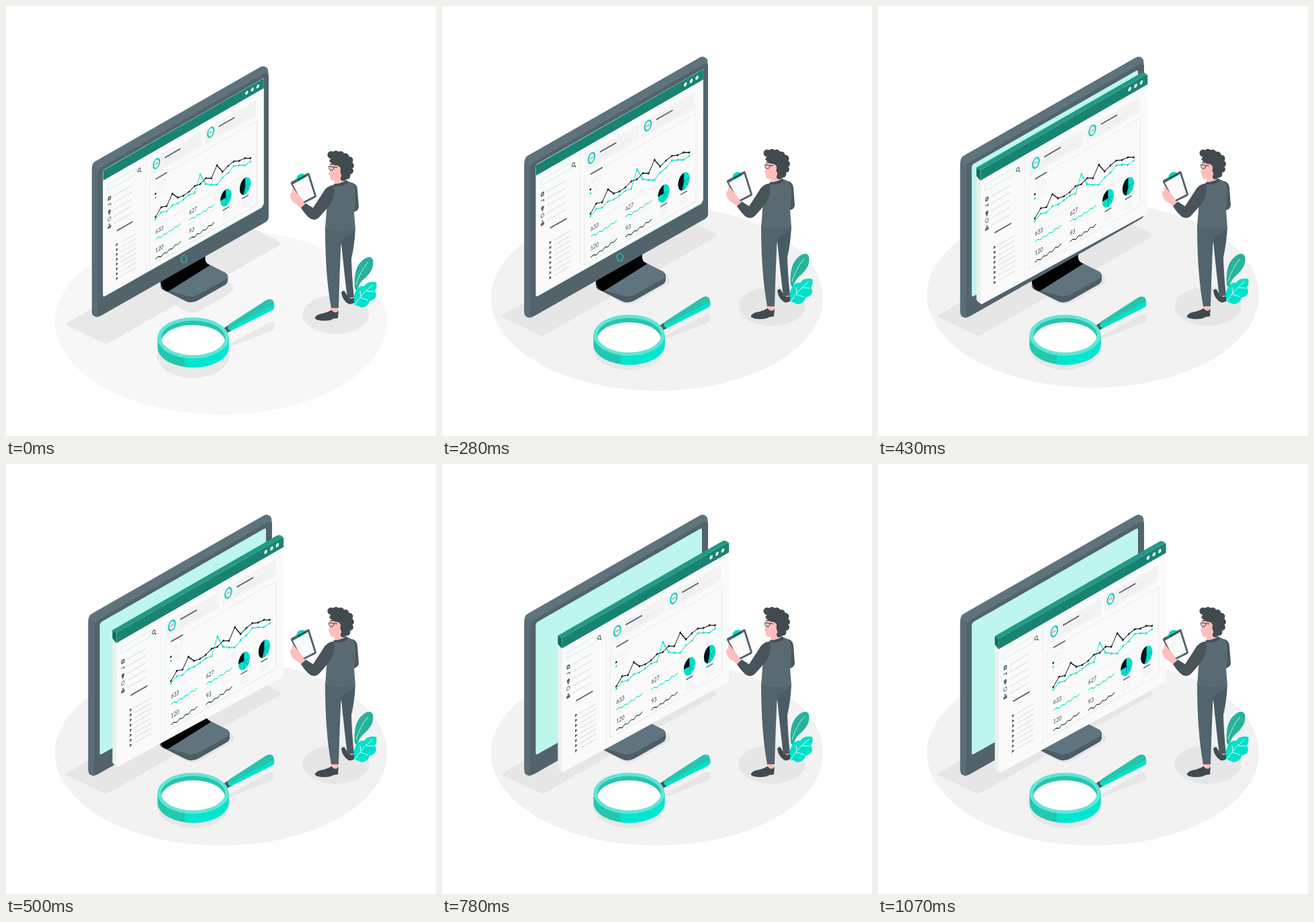
Animation of 640x640 px, one loop 1.5 s. Source, as an HTML page with a canvas:

```html
<!DOCTYPE html>
<html lang="en">
<head>
<meta charset="utf-8">
<title>Analytics desk</title>
<style>
html, body { margin: 0; width: 100%; height: 100%; overflow: hidden; background: #fff; }
canvas { display: block; width: 100vw; height: 100vh; object-fit: contain; }
</style>
</head>
<body>
<canvas id="stage" width="640" height="640"></canvas>
<script>
const ctx = document.getElementById('stage').getContext('2d');
const LOOP = 1500;
const STEPS = [0, 70, 140, 210, 280, 360, 430, 500, 570, 640, 710, 780, 860, 930, 1000, 1070];
const SLOPE = 0.575;
const CYAN = '#03e0cb', BLACK = '#0b1316', GREY = '#5d6a72', PALE = '#e5e6e6';

// Remaining share of a quadratic ease-out
const rest = (t, end) => Math.max(0, 1 - t / end) ** 2;

function fill(color, d) {
  ctx.fillStyle = color;
  ctx.fill(new Path2D(d));
}
function stroke(color, width, d) {
  ctx.strokeStyle = color;
  ctx.lineWidth = width;
  ctx.stroke(new Path2D(d));
}
function oval(color, x, y, rx, ry = rx) {
  ctx.fillStyle = color;
  ctx.beginPath();
  ctx.ellipse(x, y, rx, ry, 0, 0, Math.PI * 2);
  ctx.fill();
}
function ring(color, width, x, y, rx, ry = rx) {
  ctx.strokeStyle = color;
  ctx.lineWidth = width;
  ctx.beginPath();
  ctx.ellipse(x, y, rx, ry, 0, 0, Math.PI * 2);
  ctx.stroke();
}
function box(color, x, y, w, h, r = 0) {
  ctx.fillStyle = color;
  ctx.beginPath();
  ctx.roundRect(x, y, w, h, r);
  ctx.fill();
}
function frame(color, x, y, w, h) {
  ctx.strokeStyle = color;
  ctx.lineWidth = 0.8;
  ctx.beginPath();
  ctx.roundRect(x, y, w, h, 1);
  ctx.stroke();
}
function bar(color, x, y, len, width = 2) {
  stroke(color, width, `M${x} ${y}h${len}`);
}
function shifted(dx, dy, draw) {
  ctx.save();
  ctx.translate(dx, dy);
  draw();
  ctx.restore();
}
function label(text, x, y, size, align = 'left') {
  ctx.save();
  ctx.translate(x, y);
  ctx.scale(0.75, 1);
  ctx.font = `${size}px Lato, sans-serif`;
  ctx.textAlign = align;
  ctx.fillStyle = '#3a4246';
  ctx.fillText(text, 0, 0);
  ctx.restore();
}

function floor(t) {
  ctx.globalAlpha = 1 - 0.38 * rest(t, 430);
  oval('#f2f2f2', 320, 430 + 40 * rest(t, 430), 247, 138);
  ctx.globalAlpha = 1;
}

function shadows() {
  const c = '#e6e6e6';
  fill(c, 'M92 459L346 312Q350 310 354 312L407 339Q411 341 407 344L154 489Q150 492 146 490L92 464Q87 461 92 459Z');
  fill(c, 'M236 424L306 384L336 401Q343 407 336 414L290 441Q279 447 267 442Z');
  oval(c, 278.5, 508, 54, 33.5);
  fill(c, 'M328 494L390 460Q399 456 400 463Q400 468 396 471L338 494Z');
  oval(c, 491, 447, 49.5, 29);
}

function monitor() {
  // stand
  fill('#4c5d66', 'M229 405V417Q229 420 233 422L267 439Q277 444 287 438L329 414Q333 411 333 407V400L300 380Z');
  fill('#5f747e', 'M240 423L303 382L329 395Q337 401 329 406L288 429Q277 435 266 430Z');
  fill('#020404', 'M229 402L298 362V375Q299 381 305 384L243 423Q237 426 233 421L229 412Z');
  // case
  fill('#5e737c', 'M122.500 233Q122.500 225 129 222L383 77Q390 73 395 80L396 90V309Q396 314 391 317L134 463Q122.500 466 122.500 455Z');
  fill('#52636c', 'M131 242Q131 236 137 232L389 87Q396 83 396 91V309Q396 314 391 317L138 461Q131 464 131 457Z');
  fill('#5a6d76', 'M122.500 236Q122.500 231 124 229L132 235Q131 237 131 242V457Q131 462 134 463Q122.500 466 122.500 455Z');
  fill('#bdf6ec', 'M139.500 240Q139.500 237 142 235L384 96.500Q387 95 387 98V291Q387 294 385 295L142 432Q139.500 433 139.500 430Z');
  ring('#1fc3ad', 1.4, 265, 374, 4.6, 5.6);
}

function sidebar() {
  ring('#4a565c', 1.1, 55.5, 31, 2, 2.5);
  stroke('#4a565c', 1.2, 'M57 33.500l2 3');
  frame('#bfeee7', 7, 26, 44, 9);
  const ink = '#59656b';
  box(ink, 7.2, 45.5, 4.8, 6, 0.7);
  box('#eef0f0', 8.6, 47.5, 2, 2);
  stroke(ink, 1.2, 'M7 57.500h4.500v3');
  oval(ink, 9.6, 69, 2.2, 2.8);
  box(ink, 8.7, 71, 1.8, 3);
  ring(ink, 0.9, 9.6, 80.5, 2.2, 2.8);
  box(ink, 7, 91, 5.2, 4);
  box(ink, 8.5, 88, 2.2, 2.5);
  for (let i = 0; i < 5; i++) bar(PALE, 16, 48.5 + i * 10.7, 28);
  bar(GREY, 21, 105.5, 25, 2.2);
  for (let i = 0; i < 8; i++) {
    const y = 127 + i * 7.5;
    fill('#4a555b', `M19.800 ${y - 2.5}l3.400 2.500l-3.400 2.500z`);
    bar(PALE, 27, y, 24.5, 1.9);
  }
  bar('#e9eaea', 65.5, 107, 0.8, 180);
}

function card(x) {
  box('#f3f3f3', x, 27, 80, 24, 2);
  ring('#0ccfbd', 2, x + 9.5, 36.7, 4.8, 7.2);
  label('50%', x + 9.5, 38, 3.6, 'center');
  bar(GREY, x + 22, 35, 24.5, 2.2);
  bar('#e9e9e9', x + 22, 41, 46, 1.3);
  bar('#e9e9e9', x + 22, 45, 38, 1.3);
}

function spark(color, x, y, rise) {
  const wave = [0, -1.2, 2, -0.6, 1.8, -0.8, 1.6, -1.6, 0.6, -1.5];
  const pts = wave.map((w, i) => `${x + i * 4.35} ${y + w - rise * i / 9}`);
  stroke(color, 1.1, 'M' + pts.join('L'));
  bar('#e9eaea', x, y + 5.5, 40, 0.7);
}

function pie(x, y, from, to) {
  oval(CYAN, x, y, 8.6, 12.8);
  ctx.fillStyle = BLACK;
  ctx.beginPath();
  ctx.moveTo(x, y);
  ctx.ellipse(x, y, 8.6, 12.8, 0, from, to);
  ctx.fill();
  stroke('#078f84', 0.6, `M${x} ${y - 12.8}v25.600M${x} ${y}h8.600M${x} ${y}l6 9`);
  bar(GREY, x - 5, y + 17, 10, 1.8);
  for (let i = 0; i < 3; i++) bar(PALE, x - 6, y + 23 + i * 4.2, 12, 1);
}

function plot(color, ys) {
  const pts = ys.map((y, i) => [81 + i * 8.65, y - 260 + SLOPE * (81 + i * 8.65)]);
  stroke(color, 1.1, 'M' + pts.map(p => p.join(' ')).join('L'));
  for (const [x, y] of pts) oval(color, x, y, 1.3, 1.5);
}

function chart() {
  frame('#e4e5e5', 72, 60, 166, 130);
  box('#fafafa', 78, 56, 24, 8);
  bar(GREY, 81, 60, 18, 2.2);
  frame('#e6e7e7', 84, 69, 13, 8);
  bar('#dfe1e1', 86, 73, 7, 0.9);
  oval(BLACK, 81, 82.6, 1.3, 1.5);
  oval(CYAN, 81, 88.6, 1.3, 1.5);
  bar(PALE, 85, 82.6, 10, 1);
  bar(PALE, 85, 88.6, 10, 1);
  bar('#e9eaea', 80, 133, 149, 0.8);
  plot(CYAN, [336, 325, 323, 314, 311, 305, 298, 295, 266, 281, 282, 282, 271, 264, 253, 252, 252, 246]);
  plot(BLACK, [332, 317, 315, 296, 302, 299, 293, 284, 281, 272, 272, 252, 262, 253, 246, 245, 241, 241]);
  label('633', 81, 145, 9.3);
  label('627', 133, 145, 9.3);
  label('120', 81, 174, 9.3);
  label('93', 133, 174.5, 9.3);
  spark(CYAN, 81, 153.5, 1);
  spark(CYAN, 133, 153.5, 1);
  spark('#12352f', 81, 184, 4);
  spark('#12352f', 133, 183.5, 3);
  pie(190, 151.3, Math.PI, Math.PI * 1.5);
  pie(220, 150.5, Math.PI * 0.6, Math.PI * 1.5);
}

function panel(gap) {
  // the sheet gains depth and a lower edge as it leaves the glass
  const d = Math.min(6, gap), e = d * SLOPE;
  const left = 196 + d * 0.8, right = 197 + d * 1.8;
  fill('#eeefef', `M180 270L${180 - d} ${270 - e}V${255 + left - e}Q${180 - d} ${258 + left - e} 182 ${259 + left}Z`);
  fill('#0f6d5d', `M180 259L${180 - d} ${260 - e}V${272 - e}L180 276Z`);
  if (d > 0) fill('#219a86', `M180 261L${180 - d} ${261 - e}Q${180 - d} ${259 - e} ${182 - d} ${258.5 - e}L${424 - d} ${119.5 - e}Q${430 - d} ${116 - e} 428.500 119Z`);
  ctx.save();
  ctx.transform(1, -SLOPE, 0, 1, 180, 260);
  fill('#fafafa', `M0 0H248.800V${right - 4}Q248.800 ${right} 245 ${right}L4 ${left}Q0 ${left} 0 ${left - 4}Z`);
  box('#198372', 0, 0, 248.8, 15.5, [0, 3, 0, 0]);
  for (const x of [222.2, 231, 239.5]) oval('#fff', x, 7.4, 2.3, 2.8);
  sidebar();
  card(73);
  card(157);
  chart();
  ctx.restore();
}

function magnifier() {
  // handle
  fill('#485860', 'M322 477L331 471L336 479L326 484Z');
  fill('#03e2cc', 'M330 474L392 434Q399 434 399.500 443Q399.500 447 396 449L336 479Q331 480 330 474Z');
  fill('#27c5ad', 'M330 475Q330 471 333 469L387 434Q394 430 398 435L399 440L333 475Z');
  // rim
  fill('#22c8b0', 'M225.500 490V504A53 30 0 0 0 331.500 504V490Z');
  fill('#02e6d0', 'M266 490V533.300A53 30 0 0 0 331.500 504V490Z');
  oval('#62e5d5', 278.5, 490, 53, 30.5);
  ctx.save();
  ctx.beginPath();
  ctx.ellipse(278.5, 490, 47.5, 25.8, 0, 0, Math.PI * 2);
  ctx.clip();
  oval('#26c5ae', 278.5, 490, 48, 26);
  oval('#fff', 278.5, 496.5, 47.5, 25.8);
  ctx.restore();
}

function plant() {
  fill('#27b29b', 'M519 415Q517 389 527 377Q536 367 543 369Q549 373 545 386Q540 396 532 402Q526 407 522 419Z');
  stroke('#c9f3ea', 0.9, 'M521 410Q527 390 539 376');
  fill('#03e0cb', 'M518 440Q516 425 522 417Q526 411 533 412Q538 404 551 406Q553 413 549 419L551 424Q551 432 541 434Q540 442 529 444L523 441Z');
  stroke('#d8fbf5', 1, 'M519 440Q530 422 546 410M528 428l-1-9M527 429l12 4M536 419l12 1');
}

function man() {
  const skin = '#ffbfbc', dark = '#414a4f';
  // feet
  fill(skin, 'M483 444H494V453H484ZM508 429L517 428V435L511 435Z');
  fill(dark, 'M495 450Q493 455 488 453L484 450Q478 454 467 456Q459 459 460 463Q464 466 473 466Q484 466 487 463L494 462Z');
  fill(dark, 'M499 424Q501 420 504 422Q508 430 513 433L518 432V439Q515 442 510 441Q501 436 499 424Z');
  // legs
  fill('#4a5b64', 'M496 328H520Q519 352 514 374Q515 404 518 431L508 432Q504 400 499 350Z');
  fill('#52646d', 'M475 326H519Q518 338 503 342Q498 347 498 363Q496 412 495 447H484Q475 398 475 326Z');
  // far arm and torso
  fill('#4b575e', 'M512 260Q522 261 523 270L525 296Q525 302 518 304L513 290Z');
  fill('#596a73', 'M487 264L508 258Q519 260 520 274Q520 293 518 304L520 329Q498 335 475 329L478 290Z');
  // neck, face
  fill(skin, 'M482 233Q482 229 488 230L501 233V259Q496 265 489 262L489 257Q482 259 482 251L480 247L482 242Z');
  fill('#444f55', 'M488 262Q498 263 507 256L509 261Q499 267 488 265Z');
  // hair
  const curls = [[484, 219, 5.5], [491, 217.5, 4.8], [498, 219, 5.5], [505, 222, 5.5], [511, 227, 5.5],
    [513, 235, 5], [512, 243, 5], [507, 250, 5.5], [502, 254, 4]];
  for (const [x, y, r] of curls) oval(dark, x, y, r);
  fill(dark, 'M481 228Q488 216 502 220Q514 228 511 244Q508 255 501 255L498 246L494 235Q487 236 481 228Z');
  oval(skin, 494.5, 241, 3.6, 5);
  stroke('#30383c', 1, 'M480 236L493 238M481 236.500Q480 242 484 242Q488 242 488 237.500');
  stroke('#30383c', 1.1, 'M482 233.500l5-.5');
  // clipboard
  fill('#53636c', 'M424 262Q423 260 425 259L449 246Q451 245 452 248L462 280Q462 282 460 283L442 292Q440 293 439 290Z');
  fill('#fafafa', 'M427 263L449.500 250L459 280L441 289.500Z');
  fill('#08d3be', 'M432 255Q433 249 438 247.500Q443 246 445 249L446 252L434 259Z');
  fill('#0d4c47', 'M433 255.500L445 249L446 251.500L434 258Z');
  // hand and near arm
  fill(skin, 'M426 269Q428 268 430 272L434 277Q440 283 444 291L440 299Q434 293 428 290Q423 284 423 279Q423 274 426 276Z');
  fill('#48535a', 'M488 264Q477 265 472 275L457 298L446 291L439 298Q447 310 453 314Q461 318 467 311L482 294Q491 279 488 264Z');
}

function draw(now) {
  const t = STEPS.findLast(s => s <= now % LOOP);
  const settle = rest(t, 280), sink = rest(t, 300);
  const scale = 1 - 0.039 * settle;
  const gone = t < 384 ? 1 : Math.exp((384 - t) / 123);
  ctx.fillStyle = '#fff';
  ctx.fillRect(0, 0, 640, 640);
  floor(t);
  ctx.globalAlpha = 1 - 0.15 * sink;
  shifted(0, 12 * sink, shadows);
  ctx.globalAlpha = 1;
  ctx.save();
  ctx.translate(261, 437);
  ctx.scale(scale, scale);
  ctx.translate(-261, -437);
  monitor();
  shifted(-40 * gone, -23 * gone, () => panel(40 * (1 - gone)));
  ctx.restore();
  shifted(0, 4 * settle, magnifier);
  shifted(0, 5 * settle, plant);
  shifted(0, 2.5 * settle, man);
}

let start;
function tick(now) {
  start ??= now;
  draw(Math.max(0, now - start));
  requestAnimationFrame(tick);
}
draw(0);
requestAnimationFrame(tick);
</script>
</body>
</html>
```
